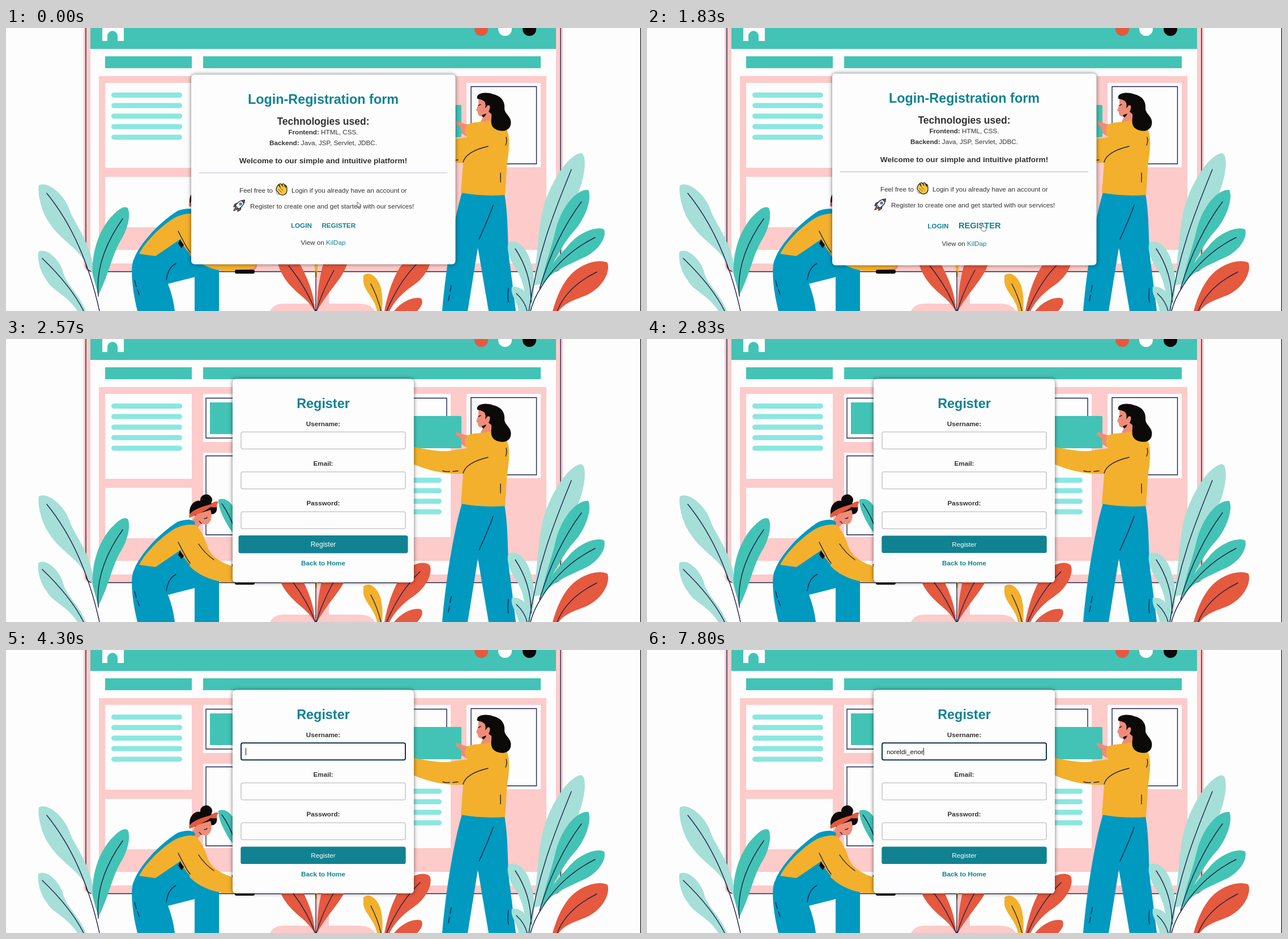
These frames come from a looping animation (1121x500 px, 8000 ms). An HTML page:

```html
<!DOCTYPE html>
<html lang="en">
<head>
<meta charset="utf-8">
<title>Login and registration</title>
<style>
html, body { margin: 0; width: 100%; height: 100%; overflow: hidden; background: #fdfdfd; }
svg { display: block; width: 100%; height: 100%; }
text { font-family: "Liberation Sans", Arial, sans-serif; font-size: 11.68px; fill: #333; white-space: pre; }
.mid { text-anchor: middle; }
.b { font-weight: 700; }
.h1 { font-size: 23.36px; fill: #118293; }
.h2 { font-size: 17.52px; }
.h3 { font-size: 13.66px; }
.link { fill: #118293; }
.teal { fill: #43c3b5; }
.pink { fill: #fccbca; }
.white { fill: #fdfdfd; }
.aqua { fill: #8ae7df; }
.pale { fill: #a5dfd8; }
.red { fill: #e5593f; }
.gold { fill: #f3b02c; }
.blue { fill: #0099c0; }
.skin { fill: #f08c76; }
.black { fill: #0c0909; }
.line { fill: none; stroke: #20234b; stroke-width: 1.4; stroke-linecap: round; }
.card { fill: #fdfdfd; filter: drop-shadow(0 0 3.5px rgba(0, 0, 0, .55)); }
.field { fill: #fdfdfd; stroke: #c9c9c9; stroke-width: 1.6; }
.focus { stroke: #12344d; stroke-width: 2; }
.icon { stroke: #17202b; stroke-width: 1.2; stroke-linejoin: round; stroke-linecap: round; }
</style>
</head>
<body>
<svg viewBox="0 0 1121 500" preserveAspectRatio="none">
  <rect class="white" width="1121" height="500"/>

  <g id="monitor">
    <path class="pink" d="M137 0H983V417Q983 431 969 431H151Q137 431 137 417Z"/>
    <path class="white" d="M149 0H971V416H149Z"/>
    <path class="line" d="M141 0V416Q141 430.5 155 430.5H965Q979 430.5 979 416V0"/>
    <path class="teal" d="M149 0H971V37H149ZM175 50H328V71H175ZM348 50H944V71H348Z"/>
    <path class="white" d="M170 0H208V23H197V14A9 9 0 0 0 179 14V23H170Z"/>
    <circle class="red" cx="839" cy="2" r="12"/>
    <circle class="white" cx="881" cy="2" r="12"/>
    <circle class="black" cx="924" cy="2" r="12"/>
    <path class="pink" d="M164 85H954V392H164Z"/>
    <path class="white" d="M175 97H328V247H175ZM175 263H328V352H175ZM348 97H500V182H348ZM348 201H500V350H348ZM620 97H785V350H620ZM813 97H944V246H813Z"/>
    <path class="line" d="M353 104.5H490V175H353ZM353 206.5H490V346H353ZM630 104.5H778V175H630ZM821 103.5H936.5V240H821Z"/>
    <path class="teal" d="M360 112H470V168H360Z"/>
    <g id="rows"></g>
  </g>

  <g id="stand">
    <path class="pink" d="M548 431H570V487H625Q645 488 651 500H466Q473 487 490 487H548Z"/>
    <path class="red" d="M478 410C486 440 500 455 520 472Q536 485 545 500C545 470 532 440 515 410ZM604 410C598 440 570 462 549 500C549 470 553 440 562 410Z"/>
    <path class="gold" d="M544 410H551L549 440H546Z"/>
    <path class="line" d="M499 420Q530 458 546 500M547 430V500M579 428Q557 468 548 500"/>
    <path class="gold" d="M631 437C642 428 657 440 662 460Q666 480 664 500H655C652 480 634 466 631 450Z"/>
    <path class="line" d="M644 452Q656 475 662 500"/>
    <path class="red" d="M668 500C675 465 687 425 711 405C724 394 745 392 749 402C753 418 738 442 720 454Q690 474 677 500Z"/>
    <path class="red" d="M685 500C699 482 722 473 733 478Q739 486 726 500Z"/>
    <path class="line" d="M731 411Q695 445 672 500"/>
  </g>

  <g id="crouching">
    <path class="teal" d="M375 284C388 278 400 290 408 310V352C397 340 374 305 375 284Z"/>
    <path class="line" d="M381 291Q396 312 405 340"/>
    <path class="black" d="M324 309C323 292 334 284 343 286C342 278 350 273 357 275C364 278 366 285 362 290C376 291 374 306 367 309L340 314Z"/>
    <path class="skin" d="M337 309L361 302C365 313 362 326 353 328L345 326L337 334L325 326Z"/>
    <path class="red" d="M323 311C332 300 345 297 361 292Q370 285 375 288Q371 293 373 297Q367 298 361 297C349 306 340 308 324 316Z"/>
    <path class="line" d="M350 317Q353 318 355 315M341 322L345 326"/>
    <path class="blue" d="M303 323Q326 315 334 324L320 390L376 405V500H333V440L286 452Q295 475 298 500H232C222 460 219 420 226 408C235 383 269 344 303 323Z"/>
    <path class="gold" d="M300 334Q322 325 335 329C345 339 350 350 355 365C361 383 376 394 402 402V430C372 431 343 420 325 402Q313 389 308 373Q288 387 264 403L235 399C245 379 272 350 300 334Z"/>
    <path class="blue" d="M264 403L308 373Q313 387 325 399L300 418Z"/>
    <path class="line" d="M304 359Q310 371 315 380Q319 389 325 396M283 445Q286 423 300 416M227 446L230 457M232 462L235 471M340 362Q350 378 367 390"/>
    <path class="black" d="M307 374L314 383L310 389L304 381ZM398 398L403 399V408Z"/>
    <path class="skin" d="M401 405Q426 406 443 418Q444 427 432 430L401 430Z"/>
    <path class="gold" d="M380 399L403 404L441 419L438 424L399 430Z"/>
    <rect class="black" x="404" y="427" width="35" height="7" rx="3"/>
  </g>

  <g id="standing">
    <rect class="teal" x="650" y="136" width="154" height="57" rx="2"/>
    <path class="blue" d="M805 290L880 293C888 340 884 382 890 420L900 500H852L833 388L815 500H770C776 430 789 345 805 290Z"/>
    <path class="skin" d="M795 164L812 170Q823 170 827 178L814 192L804 186L803 176L794 169ZM834 118H862V170H836L842 157Q832 156 833 149L830 145L834 135Z"/>
    <path class="gold" d="M812 173C820 164 838 168 849 164C872 161 888 174 888 198C889 218 884 237 884 248L881 295Q842 298 803 291L807 238C777 240 742 233 700 213V187C738 194 770 202 792 196L814 193Q808 184 812 173Z"/>
    <path class="black" d="M832 125C829 115 846 112 860 117C877 121 881 132 880 143C881 153 894 157 891 171C888 184 872 184 863 178C853 171 858 160 857 152L852 148C856 140 855 135 850 137L846 142C849 128 841 127 832 125ZM840 154L848 151Q846 157 842 158Z"/>
    <path class="line" d="M807 237C811 222 830 214 851 209M771 233Q778 235 783 234M789 234L798 233M883 193Q885 201 882 207M873 256V272M860 313Q852 336 835 373M887 460Q885 477 887 484M786 455L784 466M783 472L781 482M834 137L838 135"/>
  </g>

  <g id="plantsLeft">
    <path class="pale" d="M58 278C74 269 104 296 112 321C121 348 154 382 155 437L142 418C127 387 98 377 77 345C62 325 55 290 58 278Z"/>
    <path class="pale" d="M57 396C68 387 91 404 100 428C105 453 127 466 141 500H126C108 471 82 465 72 446C61 433 55 410 57 396Z"/>
    <path class="teal" d="M215 318C222 334 211 363 202 376C187 402 181 437 163 472L153 435C151 400 162 363 182 338C194 324 207 312 215 318Z"/>
    <path class="line" d="M72 292Q137 372 165 500M206 337C177 378 158 425 163 474M64 407Q115 456 137 500"/>
  </g>

  <g id="plantsRight">
    <path class="pale" d="M1015 221C1028 224 1021 271 1006 300C987 342 965 383 945 452L932 455C936 418 939 367 946 328C955 284 989 225 1015 221Z"/>
    <path class="teal" d="M1028 286C1035 302 1023 335 1005 356C981 382 966 416 945 455C949 423 962 394 970 358C980 316 1007 284 1028 286Z"/>
    <path class="teal" d="M1056 356C1061 372 1043 396 1019 406C986 422 960 430 943 459C950 432 972 406 991 386C1011 360 1044 349 1056 356Z"/>
    <path class="red" d="M1062 415C1068 435 1047 466 1017 475C994 484 985 488 976 500H965C972 476 982 448 1003 430C1022 414 1050 408 1062 415Z"/>
    <path class="pale" d="M887 379C905 372 922 392 927 417Q937 445 929 485L919 500C918 475 914 445 900 425C888 408 883 390 887 379Z"/>
    <path class="pale" d="M893 457C914 455 926 475 927 500H905C902 480 890 473 893 457Z"/>
    <path class="line" d="M998 250C970 320 940 390 923 500M1016 307Q969 370 942 460M1040 370Q978 401 943 461M899 390Q927 432 927 484M946 456Q931 479 926 500M1043 431Q990 457 973 500M901 469Q916 483 920 500"/>
  </g>

  <g id="home">
    <rect id="homeCard" class="card" x="327" width="466.5" rx="6"/>
    <g id="intro">
      <text class="mid b h1" x="560" y="134">Login-Registration form</text>
      <text class="mid b h2" x="560" y="171">Technologies used:</text>
      <text class="mid" x="560" y="188"><tspan class="b">Frontend:</tspan> HTML, CSS.</text>
      <text class="mid" x="560" y="206.5"><tspan class="b">Backend:</tspan> Java, JSP, Servlet, JDBC.</text>
      <text class="mid b h3" x="560" y="238.7">Welcome to our simple and intuitive platform!</text>
      <path d="M341 256H779" stroke="#bbb9cb" stroke-width="1.2"/>
      <text x="412" y="291">Feel free to</text>
      <g class="icon" fill="#fbc43b">
        <path d="M477 284L479 279L481 277L484 281L482 276L485 275L489 280L487 276L490 275L494 282L493 278Q496 278 496 284Q497 293 490 295Q484 296 480 290L477 287Z"/>
        <path fill="none" stroke-width=".7" d="M481 285L486 290M484 282L489 287M491 276Q495 277 495 280M477 290Q478 294 482 294"/>
      </g>
      <text x="504" y="291">Login if you already have an account or</text>
      <g class="icon">
        <path fill="#e4583f" d="M409 309L404 311L402 316L408 315ZM415 316L414 321L409 324L409 317Z"/>
        <path fill="#f6b62e" d="M405 317L402 323L408 320Z"/>
        <path fill="#e8f1f6" d="M421 304Q422 312 411 320L405 314Q411 304 421 304Z"/>
        <path fill="#e4583f" d="M421 304L416 305L420 309Z"/>
        <circle cx="414" cy="311" r="2" fill="#43a9e0" stroke-width=".8"/>
      </g>
      <text x="431" y="319">Register to create one and get started with our services!</text>
    </g>
    <text id="login" class="b link">LOGIN</text>
    <text id="signup" class="b link">REGISTER</text>
    <text id="view" class="mid" x="560">View on <tspan class="link">KilDap</tspan></text>
  </g>

  <g id="register">
    <rect class="card" x="400" y="70.5" width="320" height="359.5" rx="6"/>
    <text class="mid b h1" x="560" y="122">Register</text>
    <text class="mid b" x="560" y="153.5">Username:</text>
    <text class="mid b" x="560" y="224">Email:</text>
    <text class="mid b" x="560" y="294">Password:</text>
    <rect id="user" class="field" x="415" y="164.3" width="290" height="30" rx="3"/>
    <rect class="field" x="415" y="234.8" width="290" height="30" rx="3"/>
    <rect class="field" x="415" y="305.3" width="290" height="30" rx="3"/>
    <text id="typed" x="423" y="183.5" style="fill:#111"></text>
    <path id="caret" d="M0 173V186" stroke="#111" stroke-width="1"/>
    <g id="button">
      <rect x="-145.7" y="-15.3" width="291.4" height="30.6" rx="3.6" fill="#118291"/>
      <text class="mid" y="4.2" style="fill:#fdfdfd">Register</text>
    </g>
    <text class="mid b link" x="560" y="400">Back to Home</text>
  </g>

  <g id="cursor" fill="#fdfdfd" stroke="#555" stroke-width=".8" stroke-linejoin="round">
    <path id="arrow" d="M0 0V10L2.4 8L4 11.6L5.6 11L4.1 7.4H7.2Z"/>
    <path id="hand" d="M-1 1Q0 -.6 1 1V5L6 6.2Q7.2 6.6 6.8 9L5.8 13H.4L-3 8.4Q-3 6.8-1 8Z"/>
  </g>
  <path d="M1120.4 0V500" stroke="#111" stroke-width="1.2"/>
</svg>
<script>
const LOOP = 8000, PAGE = 1840, HOVER = 490, FOCUS = 3230, BLINK = 530;
const USER = "noreldi_enor";
const KEYS = [5130, 5270, 5470, 5730, 5930, 6000, 6170, 6800, 7430, 7530, 7630, 7800];
const PATH = [[0, 620, 307], [200, 617, 310], [370, 617, 310], [770, 592, 346], [LOOP, 592, 346]];
const $ = id => document.getElementById(id);
const set = (el, attrs) => { for (const k in attrs) el.setAttribute(k, attrs[k]); };
const show = (id, on) => set($(id), { visibility: on ? "inherit" : "hidden" });
const clamp = v => Math.min(1, Math.max(0, v));
const ease = (t, start, span) => 1 - (1 - clamp((t - start) / span)) ** 2.3;

function addRows(x, y, width, count) {
  for (let i = 0; i < count; i++) {
    const row = document.createElementNS("http://www.w3.org/2000/svg", "rect");
    set(row, { x, y: y + i * 18.6, width, height: 9, rx: 4.5, class: "aqua" });
    $("rows").append(row);
  }
}

function pointer(t) {
  const i = PATH.findIndex(p => p[0] > t);
  const [a, b] = [PATH[i - 1], PATH[i]];
  const p = (t - a[0]) / (b[0] - a[0]), s = p * p * (3 - 2 * p);
  return [a[1] + (b[1] - a[1]) * s, a[2] + (b[2] - a[2]) * s];
}

function drawHome(t) {
  const h = ease(t, HOVER, 260), grow = 1.8 * h;
  const size = 11.68 + 2.92 * h;
  const left = 560 - (54.5 + 5.112 * size) / 2;
  set($("homeCard"), { y: 82.3 - grow, height: 335.2 + 2 * grow });
  set($("intro"), { transform: `translate(0 ${-grow})` });
  set($("login"), { x: left, y: 352.5 + h });
  set($("signup"), { x: left + 54.5, y: 352.5 + h });
  $("signup").style.fontSize = size + "px";
  set($("view"), { y: 383.3 + grow });
  set($("cursor"), { transform: `translate(${pointer(t)})` });
  show("arrow", t < HOVER);
  show("hand", t >= HOVER);
}

function drawRegister(t) {
  const scale = 1 + .05 * (ease(t, PAGE, 290) - ease(t, 2500, 290));
  const count = KEYS.filter(k => k <= t).length;
  const since = t - (count ? KEYS[count - 1] : FOCUS);
  const focused = t >= FOCUS;
  set($("button"), { transform: `translate(560 362.7) scale(${scale})` });
  set($("user"), { class: focused ? "field focus" : "field" });
  $("typed").textContent = USER.slice(0, count);
  const end = count ? $("typed").getComputedTextLength() : 0;
  set($("caret"), { transform: `translate(${423.5 + end} 0)` });
  show("caret", focused && Math.floor(since / BLINK) % 2 === 0);
}

function render(t) {
  const home = t < PAGE;
  show("home", home);
  show("register", !home);
  show("cursor", home);
  if (home) {
    drawHome(t);
  } else {
    show("arrow", false);
    show("hand", false);
    drawRegister(t);
  }
}

addRows(186, 114, 125, 5);
addRows(640, 245, 129, 4);
const start = performance.now();
function tick() {
  render((performance.now() - start) % LOOP);
  requestAnimationFrame(tick);
}
tick();
</script>
</body>
</html>
```
